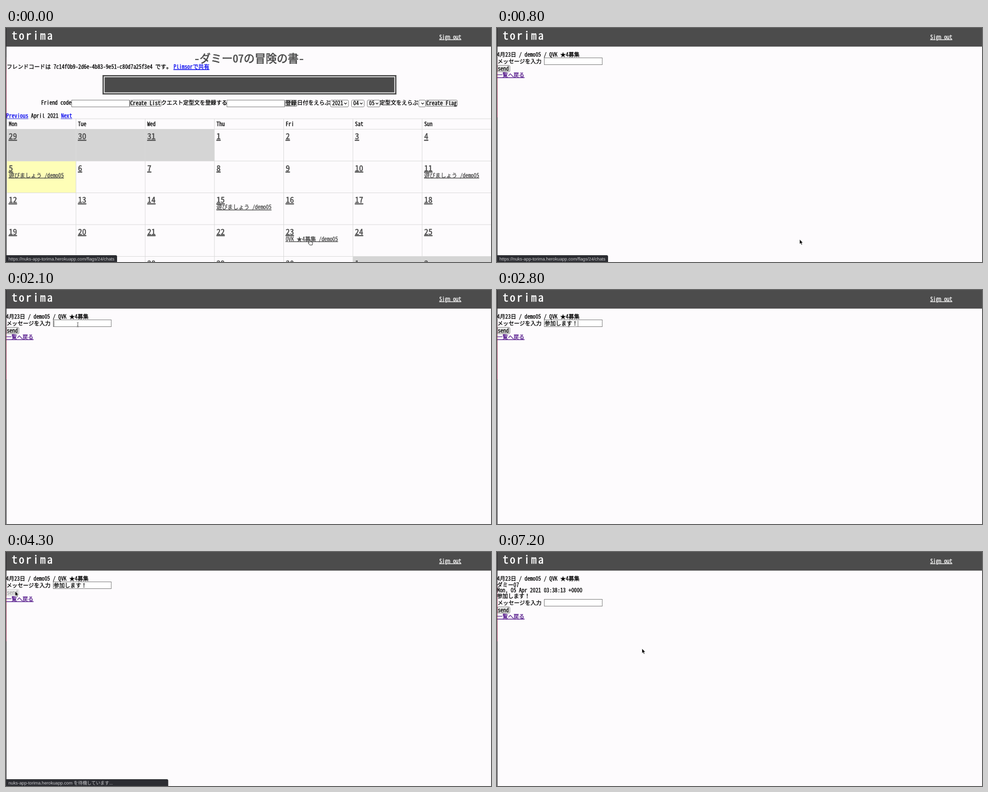
Animation of 1000 by 482 pixels, one loop 7300 ms. Source, as an HTML page:

```html
<!DOCTYPE html>
<html lang="ja">
<head>
<meta charset="utf-8">
<title>torima</title>
<style>
  html, body { margin: 0; width: 100%; height: 100%; overflow: hidden; background: #fdfbfd; }
  svg { display: block; width: 100vw; height: 100vh; }
  text {
    font: 11.35px "Noto Sans Mono CJK JP", "Noto Sans CJK JP", "Noto Sans CJK", monospace;
    fill: currentColor; stroke: currentColor; stroke-width: .32; white-space: pre;
  }
  .brand { font-size: 22.7px; letter-spacing: 3.2px; color: #fff; stroke-width: .6; }
  .title { font-size: 22.7px; color: #4c4c4c; stroke-width: .7; }
  .day { font-size: 17px; color: #4a4a4a; stroke-width: .5; }
  .event { color: #4a4a4a; }
  .link { color: #0000ee; }
  .visited { color: #551a8b; }
  .white { color: #fff; }
  .day, .event, .link, .visited, .white { text-decoration: underline; text-underline-offset: 1.5px; }
  .off { color: #a5a5a5; }
  .status { font: 9.18px "Liberation Sans", "Noto Sans CJK JP", sans-serif; color: #cbcbce; stroke: none; }
  .choice { font: 11px "Noto Sans CJK JP", "Noto Sans CJK", sans-serif; stroke: none; }
</style>
</head>
<body>
<svg id="stage" viewBox="0 0 1000 482" preserveAspectRatio="none"></svg>
<script>
const LOOP = 7300, STEP = 100;
const MEMBER = 'ダミー07', FRIEND = 'demo05', QUEST = 'QVK ★4募集';
const HOST = 'nuks-app-torima.herokuapp.com';
const URL_TEXT = `https://${HOST}/flags/24/chats`;
const WAIT_TEXT = `${HOST} を待機しています...`;

const text = (x, y, s, cls = '') => `<text x="${x}" y="${y}" class="${cls}">${s}</text>`;
const rect = (x, y, w, h, fill, more = '') =>
  `<rect x="${x}" y="${y}" width="${w}" height="${h}" fill="${fill}" ${more}/>`;
const group = (id, body) => `<g id="${id}">${body}</g>`;
const field = (x, y, w) => rect(x + .5, y + .5, w - 1, 14, '#fff', 'stroke="#777"');
const button = (x, y, w, label, cls = '') =>
  rect(x + .5, y + .5, w - 1, 13, '#efefef', `rx="2" stroke="${cls ? '#ccc' : '#777'}"`) +
  text(x + 1.2, y + 11, label, cls);
const select = (x, w, label) =>
  rect(x + .5, 148.5, w - 1, 14, '#fff', 'rx="2" stroke="#777"') + text(x + 4, 159.2, label) +
  `<path d="M${x + w - 9} 154l2.5 2.8 2.5-2.8" fill="none" stroke="#222" stroke-width="1.3"/>`;

function calendar() {
  const left = 1.5, top = 208.5, colW = 142.75, rowH = 65.5;
  const events = { 7: '遊びましょう', 13: '遊びましょう', 17: '遊びましょう', 25: QUEST };
  const rule = 'stroke="#d9d9d9" stroke-width="1"';
  let cells = '', labels = '', lines = '';
  ['Mon', 'Tue', 'Wed', 'Thu', 'Fri', 'Sat', 'Sun'].forEach((name, c) => {
    labels += text(left + c * colW + 4.3, 201.8, name);
  });
  for (let i = 0; i < 35; i++) {
    const x = left + i % 7 * colW, y = top + Math.floor(i / 7) * rowH;
    const outside = i < 3 || i > 32;
    const day = i < 3 ? 29 + i : i > 32 ? i - 32 : i - 2;
    if (outside || i === 7) cells += rect(x, y, colW, rowH, outside ? '#d5d5d5' : '#fefeb7');
    labels += text(x + 4.2, y + 20.9, day, 'day');
    if (events[i]) labels += text(x + 4.2, y + 33.7, `${events[i]} /${FRIEND}`, 'event');
  }
  for (let r = 0; r < 5; r++) lines += `M0 ${top + r * rowH}H1000`;
  for (let c = 0; c < 8; c++) lines += `M${left + c * colW} 187V482`;
  return cells + `<path d="M0 187H1000${lines}" fill="none" ${rule}/>` + labels;
}

const homePage =
  text(388, 70.5, `-${MEMBER}の冒険の書-`, 'title') +
  text(1.5, 84, 'フレンドコードは 7c14f0b9-2d6e-4b83-9e51-c80d7a25f3e4 です。') +
  text(345.5, 84, 'Plimsorで共有', 'link') +
  rect(199, 97, 606, 40, '#4a4a4a') +
  rect(202.5, 100.5, 599, 33, '#4b4b4b', 'stroke="#fff" stroke-width="1.6"') +
  text(72.5, 158.2, 'Friend code') + field(135, 148, 120) + button(255, 148, 65.5, 'Create List') +
  text(320, 158.2, 'クエスト定型文を登録する') + field(455, 148, 120) + button(575, 148, 25.5, '登録') +
  text(600.5, 158.2, '日付をえらぶ') +
  select(668.5, 38, '2021') + select(712, 27, '04') + select(744.5, 27, '05') +
  text(770.5, 158.2, '定型文をえらぶ') + select(850.5, 15, '') + button(865.5, 148, 65.5, 'Create Flag') +
  text(.5, 185.2, 'Previous', 'link') + text(51.5, 185.2, 'April 2021') + text(113.5, 185.2, 'Next', 'link') +
  calendar();

const choices = ['参加します', '参加しますか', '参加しました', '参加しますので', '参加しますよ', 'さんかします', '参加', '三化します', '酸化します'];
const popup = rect(97, 79, 136, 163, '#f4f4f4', 'rx="3" stroke="#c6c6c6"') +
  rect(98, 81, 134, 17.5, '#cfdff6') +
  choices.map((s, i) => text(104, 94 + i * 17.7, s, 'choice')).join('');

const chatPage =
  text(0, 59, `4月23日 / ${FRIEND} / ${QUEST}`) +
  group('post', text(0, 71.5, MEMBER) + text(0, 83.2, 'Mon, 05 Apr 2021 03:38:13 +0000') + text(0, 95, '参加します！')) +
  group('form',
    text(1, 73, 'メッセージを入力') + field(97, 61, 120.5) +
    group('send', button(.5, 76.5, 26.5, 'send')) +
    group('sending', button(.5, 76.5, 26.5, 'send', 'off')) +
    text(0, 100.8, '一覧へ戻る', 'visited')) +
  '<text id="typed" x="98.3" y="73"></text>' +
  '<path id="compose" d="M98.5 75H166" stroke="#333" stroke-width=".8"/>' +
  '<path id="caret" d="M167 63V75" stroke="#333" stroke-width=".8"/>' +
  group('popup', popup);

const pointer =
  '<path id="arrow" d="M0 0V9.6L2.2 7.6 3.8 11.2 5.4 10.5 3.9 7.1H6.8Z" fill="#000" stroke="#fff" stroke-width=".6"/>' +
  '<path id="hand" d="M1 1Q2-.5 3 1V4.6L7.6 5.6Q8.6 6 8.2 8L7.3 11.5H2.4L-.8 7.6Q-.8 6 1 7Z" fill="#fff" stroke="#111" stroke-width=".9"/>' +
  '<path id="beam" d="M-1.7-4Q0-4 0-3Q0-4 1.7-4M0-3V4M-1.7 5Q0 5 0 4Q0 5 1.7 5M-1 2H1" fill="none" stroke="#333" stroke-width=".8"/>';

document.getElementById('stage').innerHTML =
  '<defs><linearGradient id="edge" x1="0" y1="0" x2="0" y2="1"><stop stop-color="#3a3238"/><stop offset=".3" stop-color="#8c3450"/><stop offset="1" stop-color="#8c2347"/></linearGradient></defs>' +
  rect(0, 0, 1000, 482, '#fdfbfd') +
  group('home', homePage) + group('chat', chatPage) +
  rect(0, 38, 1000, 1, '#bdbcbd') + rect(0, 0, 1000, 38, '#4c4c4c') +
  rect(0, 0, 1, 482, '#29272b') + rect(0, 60, 1, 124, 'url(#edge)') +
  text(12, 24.3, 'torima', 'brand') + text(893.3, 22.7, 'Sign out', 'white') +
  group('bubble', '<path id="panel" fill="#2c2d32"/><text id="note" class="status" x="5" y="478.7"></text>') +
  group('pointer', pointer);

const el = id => document.getElementById(id);
const show = (id, on) => { el(id).style.display = on ? '' : 'none'; };

// time, x, y of the pointer tip
const path = [
  [0, 624, 435.5], [900, 624, 435.5], [1200, 552.5, 399.5], [1400, 217, 156], [1600, 217, 156],
  [2000, 148, 71], [3000, 148, 71], [3300, 75, 122], [3700, 19, 81], [4600, 19, 81],
  [5300, -2, 75], [5500, -2, 75], [6000, 218, 171], [6100, 136, 174], [6300, 299, 199], [LOOP, 299, 199]
];

function pointerAt(t) {
  const i = path.findIndex(p => p[0] > t);
  const [t0, x0, y0] = path[i - 1], [t1, x1, y1] = path[i];
  const k = (t - t0) / (t1 - t0);
  return [x0 + (x1 - x0) * k, y0 + (y1 - y0) * k];
}

const fade = age => age < 300 ? 1 : age < 400 ? .7 : age < 500 ? .31 : age < 600 ? .1 : 0;

function bubbleAt(t) {
  if (t < 1500) return [fade(t - 800), t < 900 ? 229 : 334.5, URL_TEXT];
  if (t < 4200) return [0, 0, ''];
  return [fade(t - 4600), 334.5, WAIT_TEXT];
}

function draw(t) {
  const chat = t >= 800, posted = t >= 4600, sending = t >= 4100;
  show('home', !chat);
  show('chat', chat);
  show('post', posted);
  show('send', !sending || posted);
  show('sending', sending && !posted);
  el('form').setAttribute('transform', `translate(0 ${posted ? 36 : 0})`);

  const composing = t >= 2300 && t < 2700;
  el('typed').textContent = posted || t < 2300 ? '' : t < 2600 ? 'さんかします' : t < 2700 ? '参加します' : '参加します！';
  show('compose', composing);
  show('popup', composing);
  const blinkOn = t < 3300 || t >= 3800;
  show('caret', t >= 2100 && t < 3900 && blinkOn);
  el('caret').setAttribute('transform', `translate(${t < 2300 ? -68 : 0} 0)`);

  const [opacity, width, note] = bubbleAt(t);
  el('bubble').style.opacity = opacity;
  el('panel').setAttribute('d', `M0 468H${Math.max(width - 3, 0)}q3 0 3 3V482H0Z`);
  el('note').textContent = note;

  const [x, y] = pointerAt(t);
  el('pointer').setAttribute('transform', `translate(${x} ${y})`);
  const beam = t >= 2000 && t < 3100;
  show('hand', !chat);
  show('beam', beam);
  show('arrow', chat && !beam);
}

function tick() {
  draw(Math.floor(performance.now() % LOOP / STEP) * STEP);
  requestAnimationFrame(tick);
}
tick();
</script>
</body>
</html>
```
